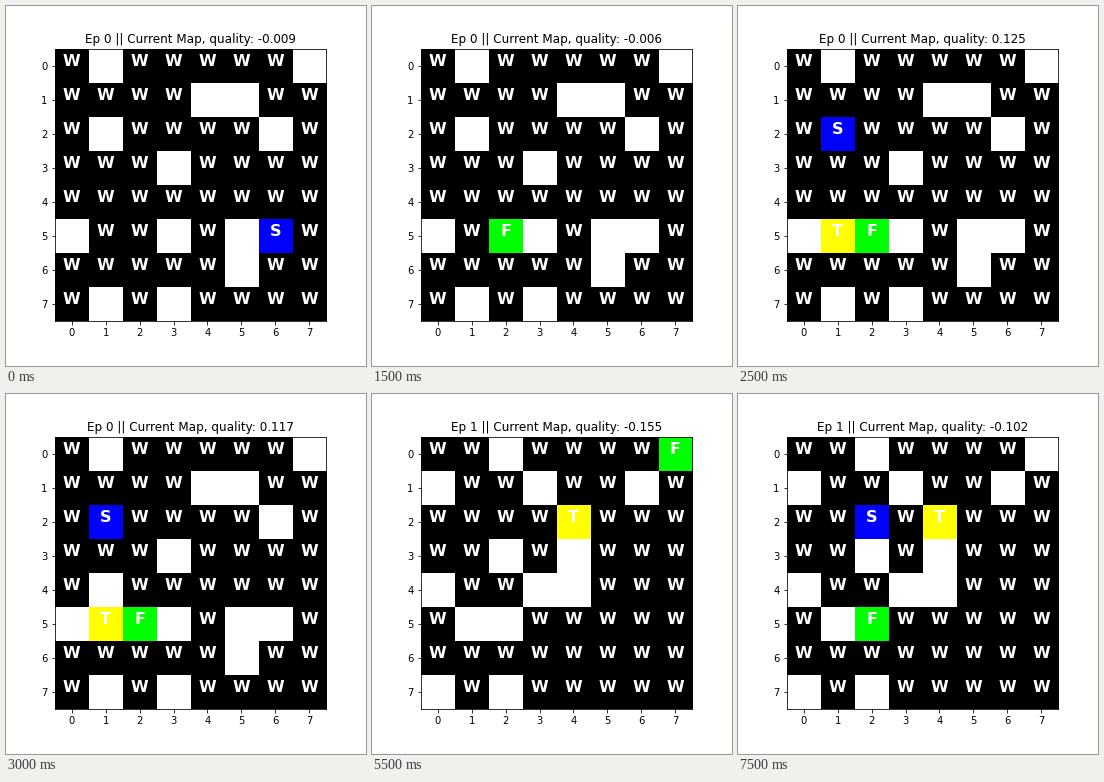
These frames come from a looping animation (360 px wide and 360 px high, 8000 ms). A matplotlib script:

```python
import numpy as np
import matplotlib.pyplot as plt
from matplotlib.animation import FuncAnimation

STEP_MS = 500
STEPS = 16
COLORS = {"W": (0, 0, 0), ".": (255, 255, 255), "S": (0, 0, 255),
          "T": (255, 255, 0), "F": (0, 255, 0)}

# Each episode: first step, start map, and edits (step, row, col, tile, quality).
EPISODES = [
    (0, -0.009,
     "W.WWWWW. WWWW..WW W.WWWW.W WWW.WWWW "
     "WWWWWWWW .WW.W.SW WWWWW.WW W.W.WWWW",
     [(2, 5, 6, ".", -0.075), (3, 5, 2, "F", -0.006), (4, 5, 1, "T", 0.063),
      (5, 2, 1, "S", 0.125), (6, 4, 1, ".", 0.117), (7, 3, 1, ".", 1.349)]),
    (11, -0.155,
     "WW.WWWWF .WW.WW.W WWWWTWWW WW.W.WWW "
     ".WW..WWW W..WWWWW WWWWWWWW .W.WWWWW",
     [(13, 0, 7, ".", -0.221), (14, 2, 2, "S", -0.161), (15, 5, 2, "F", -0.102)]),
]
PATH_STEPS = range(8, 11)


def state(step):
    """Episode number, tile grid and quality at a step."""
    ep = max(i for i, e in enumerate(EPISODES) if e[0] <= step)
    _, quality, rows, edits = EPISODES[ep]
    grid = [list(row) for row in rows.split()]
    for when, r, c, tile, q in edits:
        if when <= step:
            grid[r][c], quality = tile, q
    return ep, grid, quality


def pixels(grid):
    return np.array([[COLORS[t] for t in row] for row in grid], dtype=np.uint8)


def arrow(x, y, dx, dy, color, width, head, length):
    return ax.arrow(x, y, dx, dy, width=width, head_width=head, head_length=length,
                    length_includes_head=True, fc="white", ec=color, lw=1)


plt.rcParams["font.family"] = "DejaVu Sans"
fig, ax = plt.subplots(figsize=(5, 5), dpi=72)
fig.subplots_adjust(left=0.125, right=0.9, bottom=0.125, top=0.88)

image = ax.imshow(pixels(state(0)[1]), interpolation="nearest")
ax.set_xticks(range(8))
ax.set_yticks(range(8))
title = ax.set_title("", fontsize=12)
labels = [[ax.text(c, r, "", color="white", ha="center", fontsize=16, weight="bold")
           for c in range(8)] for r in range(8)]

path = [arrow(1.1, y + 0.1, 0, 1, "y", 0.05, 0.25, 0.22) for y in (2, 3, 4)]
path.append(arrow(0.9, 4.9, 1, 0, "g", 0.04, 0.18, 0.17))


def update(step):
    ep, grid, quality = state(step)
    image.set_data(pixels(grid))
    title.set_text(f"Ep {ep} || Current Map, quality: {quality:.3f}")
    for row, tiles in zip(labels, grid):
        for label, tile in zip(row, tiles):
            label.set_text("" if tile == "." else tile)
    for part in path:
        part.set_visible(step in PATH_STEPS)
    return [image, title, *path]


anim = FuncAnimation(fig, update, frames=STEPS, init_func=lambda: update(0),
                     interval=STEP_MS, repeat=True, repeat_delay=0, blit=False)
plt.show()
```
